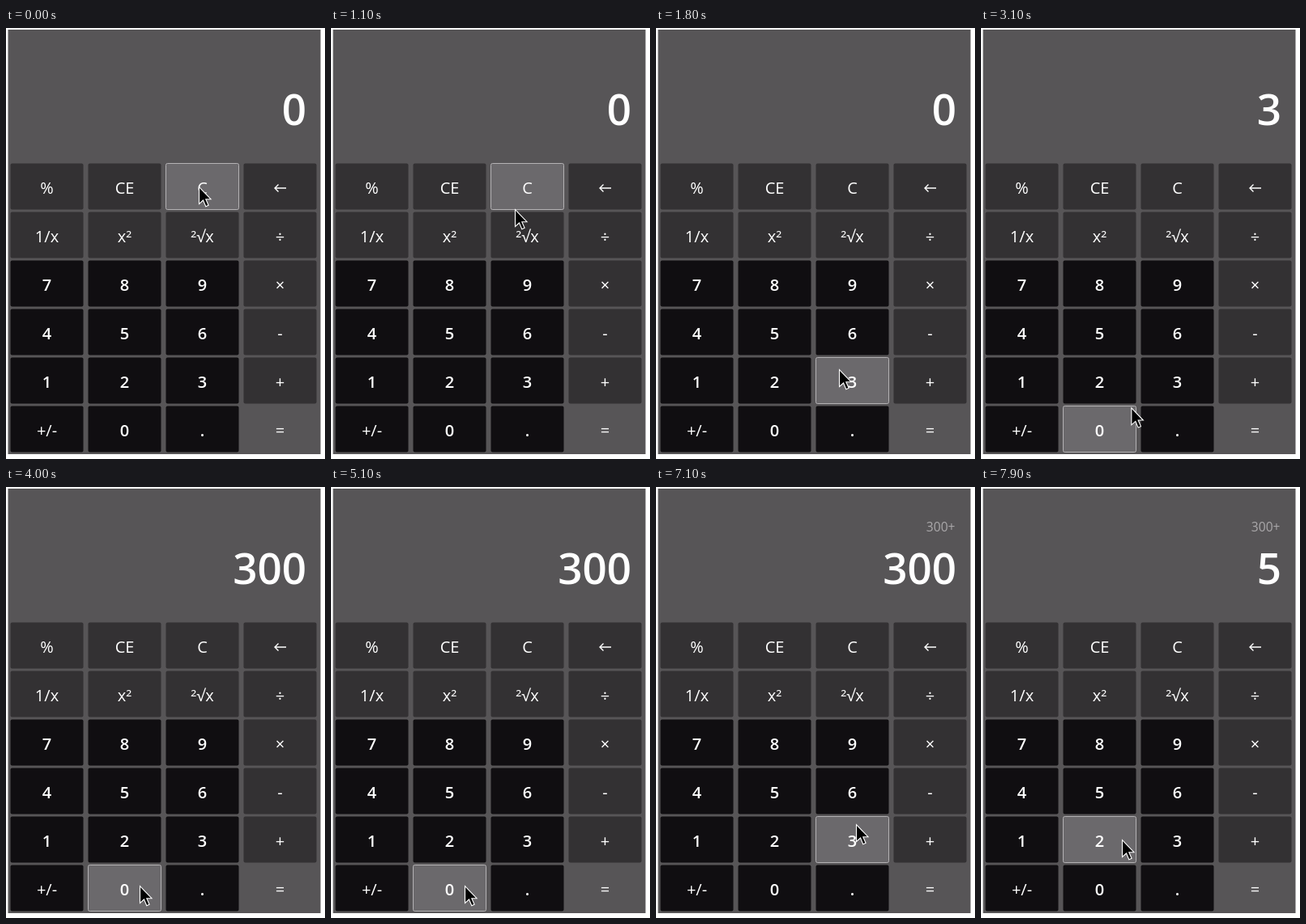
These frames come from a looping animation (394 by 533 pixels, 8 s). An HTML page:

```html
<!DOCTYPE html>
<html lang="en">
<head>
<meta charset="utf-8">
<title>Calculator</title>
<style>
  html, body { margin: 0; width: 100%; height: 100%; overflow: hidden; background: #fff; }
  svg { display: block; font-family: "Open Sans", "Noto Sans", sans-serif; fill: #fff; }
  .key text { font-size: 20px; text-anchor: middle; }
  .function rect { fill: #333133; }
  .digit rect { fill: #100e11; }
  .digit text { font-weight: 600; }
  .plain rect { fill: none; }
  .key.hover rect { fill: #6b696c; stroke: #b4b2b4; }
  .arrow { fill: none; stroke: #fff; stroke-width: 1.4; }
  #history { font-size: 15.6px; fill: #aaa8aa; text-anchor: end; }
  #display { font-size: 53px; font-weight: 600; text-anchor: end; }
</style>
</head>
<body>
<svg width="394" height="533" viewBox="0 0 394 533">
  <rect x="2.5" y="2" width="386" height="525" fill="#575557"/>
  <text id="history" x="369.5" y="55"></text>
  <text id="display" x="371" y="120"></text>
  <g id="keys"></g>
  <path id="cursor" d="M0 0V21L5 16.5L8.3 24.3L11.6 22.8L8.3 15.2H14.5Z" fill="#000" stroke="#fff" stroke-width="1.1"/>
</svg>
<script>
const LOOP = 8000, STEP = 100;
const LABELS = ["%", "CE", "C", "←", "1/x", "x²", "²√x", "÷", "7", "8", "9", "×",
  "4", "5", "6", "-", "1", "2", "3", "+", "+/-", "0", ".", "="];

// time, x, y of the pointer tip
const PATH = [
  [0, 238, 196], [900, 238, 196], [1100, 227, 224], [1800, 226, 422],
  [2700, 226, 422], [3300, 165, 493], [6100, 165, 493], [6200, 188, 488],
  [6700, 335, 440], [6900, 335, 440], [7100, 247, 417], [7400, 150, 385],
  [7700, 150, 385], [7900, 174, 436]
];

// time, history line, display
const SCREENS = [
  [0, "", "0"], [2300, "", "3"], [3600, "", "30"], [3900, "", "300"],
  [6900, "300+", "300"], [7600, "300+", "5"]
];

const byId = id => document.getElementById(id);

function add(parent, name, attributes, text = "") {
  const node = document.createElementNS("http://www.w3.org/2000/svg", name);
  for (const key in attributes) node.setAttribute(key, attributes[key]);
  node.textContent = text;
  return parent.appendChild(node);
}

const keys = LABELS.map((label, i) => {
  const column = i % 4, row = Math.floor(i / 4);
  const x = 5 + 96 * column, y = 167 + 60 * row;
  const type = label === "=" ? "plain" : row > 1 && column < 3 ? "digit" : "function";
  const node = add(byId("keys"), "g", { class: "key " + type });
  add(node, "rect", { x: x + .5, y: y + .5, width: 90, height: 57, rx: 2 });
  if (label === "←") {
    add(node, "path", { class: "arrow", d: `M${x + 53} ${y + 31}h-14m4.5-4.5l-4.5 4.5l4.5 4.5` });
  } else {
    const style = label === "+/-" ? "font-weight:400" : "";
    add(node, "text", { x: x + 45.5, y: y + 37.5, style }, label);
  }
  return { node, x, y };
});

function pointerAt(time) {
  const next = PATH.findIndex(point => point[0] > time);
  if (next < 0) return PATH[PATH.length - 1].slice(1);
  const [t0, x0, y0] = PATH[next - 1], [t1, x1, y1] = PATH[next];
  const k = (time - t0) / (t1 - t0);
  return [x0 + (x1 - x0) * k, y0 + (y1 - y0) * k];
}

function draw(now) {
  const time = Math.floor(now % LOOP / STEP) * STEP;
  const [px, py] = pointerAt(time);
  const [, history, display] = SCREENS.filter(screen => screen[0] <= time).pop();
  byId("history").textContent = history;
  byId("display").textContent = display;
  byId("cursor").setAttribute("transform", `translate(${px + .5} ${py + .5})`);
  for (const { node, x, y } of keys) {
    node.classList.toggle("hover", px >= x && px < x + 91 && py >= y && py < y + 58);
  }
}

const start = performance.now();
function tick() {
  draw(performance.now() - start);
  requestAnimationFrame(tick);
}
tick();
</script>
</body>
</html>
```
